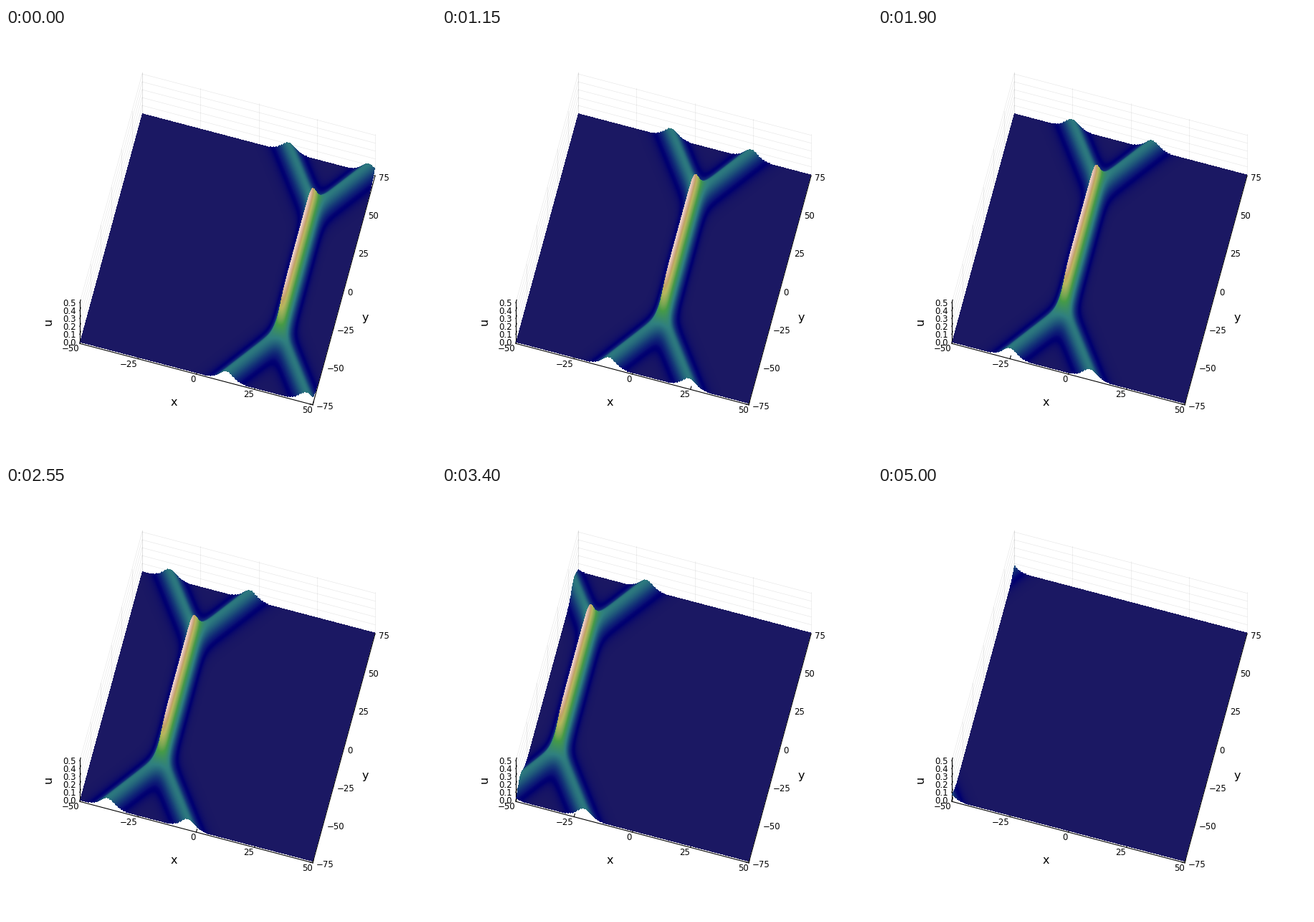
A matplotlib script that plays this animation: 600x600 px, repeating every 5.05 s.

```python
import numpy as np
import matplotlib.pyplot as plt
from matplotlib.animation import FuncAnimation

FRAMES, INTERVAL = 101, 50
X0, Y0 = -50, -75                     # near-left corner of the domain
OX, OY = 103.0, 438.6                 # its pixel position at u = 0
XV = np.array([3.25, 0.855])          # pixels per unit of x
YV = np.array([0.58, -2.13])          # pixels per unit of y
LIFT = 110.0                          # pixels per unit of u
ZMIN, ZMAX = -0.015, 0.515
LEFT, RIGHT, TOP, BOTTOM = 100, 520, 60, 530
REACH = 57                            # tallest lift in pixels


def project(x, y, z):
    px = OX + XV[0] * (x - X0) + YV[0] * (y - Y0)
    py = OY + XV[1] * (x - X0) + YV[1] * (y - Y0) - LIFT * z
    return px, py


def color_table(n=2048):
    u = np.linspace(0, 0.5, n)
    earth = plt.get_cmap("gist_earth")
    pos = np.interp(u, [0.012, 0.125, 0.5], [0.03, 0.264, 0.935])
    table = earth(pos)
    flat = np.array([27, 24, 99, 255]) / 255
    foot = np.array([0, 0, 112, 255]) / 255
    k = np.clip(u / 0.012, 0, 1)[:, None]
    low = flat * (1 - k) + foot * k
    mix = np.clip((u - 0.012) / 0.015, 0, 1)[:, None]
    return (255 * (low * (1 - mix) + table * mix)).astype(np.uint8)


TABLE = color_table()

# Ground coordinates under every pixel, with extra rows below for the rays
px, py = np.meshgrid(np.arange(LEFT, RIGHT) + 0.5,
                     np.arange(TOP, BOTTOM + REACH + 1) + 0.5)
det = XV[0] * YV[1] - XV[1] * YV[0]
GX = X0 + ((px - OX) * YV[1] - (py - OY) * YV[0]) / det
GY = Y0 + ((py - OY) * XV[0] - (px - OX) * XV[1]) / det
INSIDE = (abs(GX) <= 50) & (abs(GY) <= 75)
ARMS = np.exp(-10.1) * np.cosh(GY / 4)


def soliton(center):
    c = np.cosh((GX - center) / 2)
    return 0.5 * (1 + ARMS * c) / (c + ARMS) ** 2


def render(i):
    """Follow each pixel's ray down to the nearest point of the surface."""
    h = LIFT * soliton(30.1 - i)
    rows = BOTTOM - TOP
    height = np.full((rows, RIGHT - LEFT), -1.0)
    for s in range(REACH):
        here, there = h[s:s + rows] - s, h[s + 1:s + 1 + rows] - s - 1
        in_next = INSIDE[s + 1:s + 1 + rows]
        hit = INSIDE[s:s + rows] & (here >= 0)
        hit &= np.where(in_next, there < 0, here < 1)
        a, b = here[hit], there[hit]
        frac = np.where(in_next[hit], a / np.maximum(a - b, 1e-9), a)
        height[hit] = s + frac
    index = np.clip(height / LIFT / 0.5 * (len(TABLE) - 1), 0, len(TABLE) - 1)
    image = TABLE[index.astype(int)]
    image[height < 0] = 0
    return image


fig = plt.figure(figsize=(600 / 72, 600 / 72), dpi=72, facecolor="white")
ax = fig.add_axes([0, 0, 1, 1])
ax.set_xlim(0, 600)
ax.set_ylim(600, 0)
ax.axis("off")


def line(a, b, **style):
    p, q = project(*a), project(*b)
    ax.plot([p[0], q[0]], [p[1], q[1]], **style)


def label(x, y, text, size=11.8, **kw):
    ax.text(x, y, text, size=size, family="DejaVu Sans", va="baseline", **kw)


def number(v):
    return str(v).replace("-", "\u2212")


XT, YT = range(-50, 51, 25), range(-75, 76, 25)
ZT = [k / 10 for k in range(6)]
grid = dict(color="black", alpha=0.1, lw=0.6, zorder=1)
axis = dict(color="black", lw=1.1, zorder=2)

for x in XT:
    line((x, 75, ZMIN), (x, 75, ZMAX), **grid)
    line((x, -75, ZMIN), (x, -73, ZMIN), **axis)
    lx, ly = project(x, -75, 0)
    label(lx - 0.6, ly + 12.7, number(x), ha="right")
for y in YT:
    line((-50, y, ZMIN), (-50, y, ZMAX), **grid)
    line((50, y, ZMIN), (48.7, y, ZMIN), **axis)
    lx, ly = project(50, y, 0)
    label(lx + 4.8, ly + 8.2, number(y), ha="left")
for z in ZT:
    line((-50, 75, z), (50, 75, z), **grid)
    line((-50, -75, z), (-50, 75, z), **grid)
    line((-50, -75, z), (-50, -73, z), **axis)
    lx, ly = project(-50, -75, z)
    label(lx - 5.4, ly + 4.6, f"{z:.1f}", ha="right")

line((-50, -75, ZMIN), (50, -75, ZMIN), **axis)
line((50, -75, ZMIN), (50, 75, ZMIN), **axis)
line((-50, -75, ZMIN), (-50, -75, ZMAX), **axis)

label(234.5, 527, "x", 16, ha="center")
label(501.5, 408.5, "y", 16, ha="center")
label(63.5, 410, "u", 16, ha="center", rotation=90, rotation_mode="anchor")

surface = ax.imshow(render(0), extent=(LEFT, RIGHT, BOTTOM, TOP),
                    interpolation="nearest", aspect="auto", zorder=3)
ax.set_xlim(0, 600)
ax.set_ylim(600, 0)


def update(i):
    surface.set_data(render(i))
    return [surface]


anim = FuncAnimation(fig, update, frames=FRAMES, interval=INTERVAL,
                     repeat=True, repeat_delay=0, blit=False)
plt.show()
```
